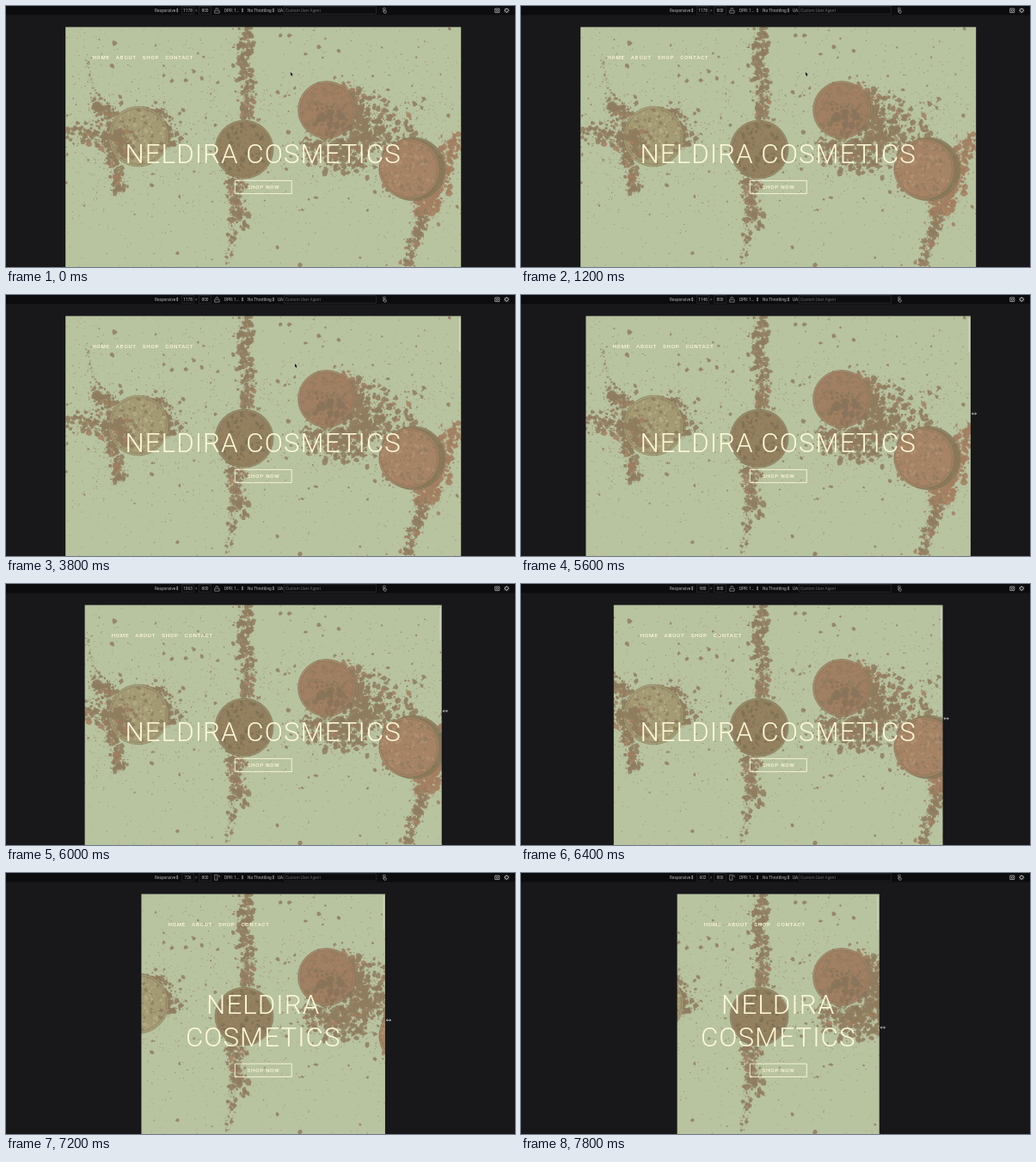
An HTML page with a canvas that plays this animation: 592 px wide and 304 px high, repeating every 8000 ms.

```html
<!DOCTYPE html>
<html lang="en">
<head>
<meta charset="utf-8">
<style>
  html, body { margin: 0; width: 100%; height: 100%; overflow: hidden; background: #18181b; }
  canvas { display: block; width: 592px; height: 304px; }
</style>
</head>
<body>
<canvas id="stage"></canvas>
<script>
const W = 592, H = 304, LOOP = 8000, STEP = 200;
const SCALE = 0.3905, MID = 299.2, TOP = 24.6;
const CREAM = '#fdf8d8', INK = '#b4b4b8', EDGE = '#343438';
const GREEN = '#b8c3a0', BROWN = '#8f7d5f', DARK = '#7d7153', ROSE = '#a37f62';
const dpr = window.devicePixelRatio || 1;

function surface(canvas) {
  canvas.width = W * dpr;
  canvas.height = H * dpr;
  const c = canvas.getContext('2d');
  c.scale(dpr, dpr);
  return c;
}

const g = surface(document.getElementById('stage'));
const photo = document.createElement('canvas');
paintPhoto(surface(photo));

function paintPhoto(c) {
  let seed = 11;
  const rnd = () => (seed = seed * 16807 % 2147483647) / 2147483647;
  const gauss = () => rnd() + rnd() + rnd() + rnd() - 2;

  function grain(x, y, r, color) {
    c.fillStyle = color;
    c.beginPath();
    for (let a = 0; a < 6; a++) {
      const d = r * (0.5 + rnd() * 0.8);
      c.lineTo(x + d * Math.cos(a), y + d * Math.sin(a));
    }
    c.fill();
  }

  // Powder along a line; the number and size of grains follow from its area
  function dust(x1, y1, x2, y2, spread, color = BROWN, density = 0.5) {
    const count = density * spread * (Math.hypot(x2 - x1, y2 - y1) + 3 * spread);
    for (let i = 0; i < count; i++) {
      const k = rnd();
      grain(x1 + (x2 - x1) * k + gauss() * spread, y1 + (y2 - y1) * k + gauss() * spread,
        0.35 + Math.min(4, spread * 0.55) * rnd() ** 5, rnd() < 0.12 ? ROSE : color);
    }
  }

  function pan(x, y, r, face, shine) {
    c.fillStyle = face;
    c.strokeStyle = DARK;
    c.lineWidth = 0.6;
    for (const radius of [r, r - 2.5]) {
      c.beginPath();
      c.arc(x, y, radius, 0, 7);
      c.fill();
      c.stroke();
    }
    for (let i = 0; i < 420; i++) {
      const a = rnd() * 6.3, d = Math.sqrt(rnd()) * (r - 3);
      grain(x + d * Math.cos(a), y + d * Math.sin(a), 0.4 + 2.6 * rnd() ** 4, i % 2 ? BROWN : shine);
    }
  }

  c.fillStyle = GREEN;
  c.fillRect(0, 0, W, H);
  c.globalAlpha = 0.85;

  // Fine specks everywhere, thicker around the middle band
  for (let i = 0; i < 2600; i++)
    grain(69 + rnd() * 461, i % 3 ? 150 + gauss() * 95 : TOP + rnd() * 280, 0.2 + 0.5 * rnd() + 3 * rnd() ** 30, BROWN);

  // Left pan
  dust(93, 58, 108, 118, 2);
  dust(103, 112, 130, 140, 10);
  dust(76, 145, 128, 152, 12, BROWN, 0.28);
  dust(118, 150, 133, 215, 8);
  dust(172, 122, 194, 155, 12);
  // Vertical streak
  dust(277, 25, 281, 132, 9);
  dust(270, 195, 268, 252, 10);
  dust(264, 250, 258, 300, 5, BROWN, 0.3);
  // Right pans
  dust(400, 98, 418, 160, 15);
  dust(355, 165, 405, 175, 20, BROWN, 0.35);
  dust(400, 130, 470, 155, 32, BROWN, 0.12);
  dust(522, 152, 505, 210, 10, ROSE);
  dust(498, 215, 484, 245, 13, ROSE);
  dust(486, 240, 466, 304, 7);
  dust(438, 155, 450, 215, 11, BROWN, 0.3);

  pan(154, 152, 35, '#a49a74', '#b3ac84');
  pan(277, 167, 34, '#93805f', DARK);
  pan(373, 121, 33.5, ROSE, '#987a5c');
  pan(474, 190, 37, '#8a7a5a', DARK);
  pan(469, 190, 35, '#a78466', '#b09070');
  dust(128, 145, 140, 172, 9);
  dust(365, 128, 388, 136, 15, '#88745a', 0.3);
}

// Linear interpolation through points of [time, value]
function track(points, t) {
  const i = Math.max(1, points.findIndex(p => p[0] >= t));
  const [[t0, v0], [t1, v1]] = points.slice(i - 1, i + 1);
  return v0 + (v1 - v0) * Math.max(0, (t - t0) / (t1 - t0));
}

const widths = [[5200, 1178], [5600, 1146], [6400, 980], [7200, 726], [7600, 606], [7800, 602]];
const progress = (t, from, to) => Math.min(1, Math.max(0, (t - from) / (to - from)));

function text(str, x, y, font, color, spacing = 0, align = 'left') {
  g.font = font + ' Roboto, sans-serif';
  g.letterSpacing = spacing + 'px';
  g.textAlign = align;
  g.fillStyle = color;
  g.fillText(str, x, y);
  return g.measureText(str).width;
}

function shape(path, x, y, color, width) {
  g.save();
  g.translate(x, y);
  g.fillStyle = g.strokeStyle = color;
  g.lineWidth = width;
  g[width ? 'stroke' : 'fill'](new Path2D(path));
  g.restore();
}

const box = (x, y, w, h, color, width = 0.6) => shape(`M0 0h${w}v${h}h${-w}z`, x, y, color, width);

function toolbar(size) {
  const label = (s, x, color = INK, align) => text(s, x, 7, '4.75px', color, 0, align);
  g.fillStyle = '#0c0c0e';
  g.fillRect(0, 0, W, 10.5);

  label('Responsive', 173);
  label('DPR: 1…', 254);
  label('No Throttling', 281);
  for (const x of [199.2, 275, 311])
    shape('M-1.2-.5h2.4L0-2.4zM-1.2 .5h2.4L0 2.4z', x, 5, INK);

  for (const [x, value] of [[204.5, size], [224.5, 800]]) {
    box(x, 0.7, 14, 8.6, EDGE);
    label(value, x + 7, INK, 'center');
  }
  label('×', 220, '#77777b');
  label('UA:', 316);
  box(323.5, 0.7, 107, 8.6, EDGE);
  label('Custom User Agent', 325, '#67676b');

  shape(size > 800 ? 'M0 3h5.4v3H0zM1 2L1.5 .5h2L4.3 2' : 'M0 0h3.2v6H0zM4 .5l1.5 .5v2', 242.7, 2.2, INK, 0.6);
  shape('M1.5 0a1.5 1.5 0 1 0 .1 0M1.5 1.5v3L0 4l1.7 2.3h2L4.1 4 2 3.4', 438.3, 1.9, INK, 0.6);
  shape('M0 0h5v4.6H0zM2.5 1.4a1 1 0 1 0 .1 0', 568.8, 3, INK, 0.8);
  for (let i = 0; i < 8; i++) {
    const a = i * Math.PI / 4;
    shape('M-.8 1.8h1.6M0 1.8v1.2', 582.3, 5.2, INK, 0.9);
    g.translate(582.3, 5.2);
    g.rotate(Math.PI / 4);
    g.translate(-582.3, -5.2);
  }
}

function page(size, t) {
  const w = size * SCALE, left = MID - w / 2;
  g.save();
  g.beginPath();
  g.rect(left, TOP, w, H - TOP);
  g.clip();
  g.drawImage(photo, 0, 0, W, H);

  let x = left + 31;
  for (const item of ['HOME', 'ABOUT', 'SHOP', 'CONTACT'])
    x += text(item, x, 62.3, '500 6.26px', CREAM, 0.72) + 7;

  const wrapped = size < 820;
  const title = wrapped ? ['NELDIRA', 'COSMETICS'] : ['NELDIRA COSMETICS'];
  const base = wrapped ? 164.2 : 183;
  title.forEach((s, i) => text(s, MID, base + i * 37.6, '300 31.3px', CREAM, 1.05, 'center'));
  const y = wrapped ? 222.2 : 203.4;
  box(266.3, y, 66, 15.2, CREAM, 0.9);
  text('SHOP NOW', MID + 0.3, y + 9.9, '500 6.26px', CREAM, 0.72, 'center');

  if (t >= 3000) {
    g.fillStyle = 'rgba(225,225,225,.5)';
    g.fillRect(left + w - 2.4, 27, 1.6, 39);
  }
  g.restore();
}

function cursor(size, t) {
  if (t >= 5000) {
    const u = progress(t, 5400, 7800);
    shape('M-2.6 0h5.2M-1.3-1.3L-2.7 0l1.4 1.3M1.3-1.3L2.7 0 1.3 1.3',
      MID + size * SCALE / 2 + 4, 133 + 64 * u - 17 * u * u, '#c9c9c9', 0.8);
  } else {
    const nudge = progress(t, 2800, 3800), reach = progress(t, 4000, 5000);
    shape('M0 0v4l.9-.7 .7 1.6 .7-.3-.7-1.5 1.2-.1z',
      331 + 5 * nudge + 197 * reach, 77 + 3 * nudge + 53 * reach, '#111');
  }
}

function frame(now) {
  const t = Math.floor(now % LOOP / STEP) * STEP;
  const size = Math.round(track(widths, t));
  g.fillStyle = '#18181b';
  g.fillRect(0, 0, W, H);
  toolbar(size);
  page(size, t);
  cursor(size, t);
  requestAnimationFrame(frame);
}
requestAnimationFrame(frame);
</script>
</body>
</html>
```
